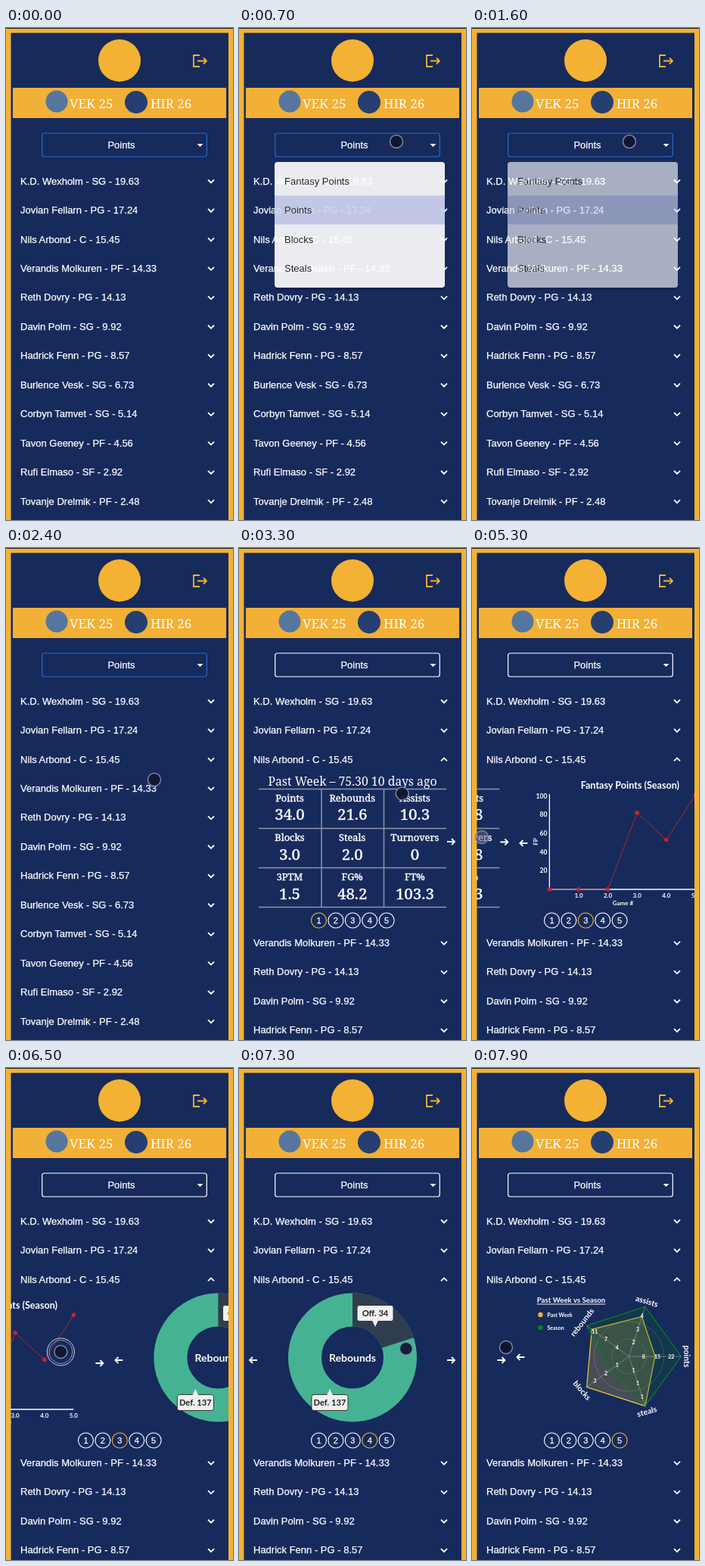
These frames come from a looping animation (300x650 px, 8 s). An HTML page:

```html
<!DOCTYPE html>
<html lang="en">
<head>
<meta charset="utf-8">
<title>Player stats</title>
<style>
html, body { margin: 0; width: 100%; height: 100%; overflow: hidden; background: #f2b134; }
svg { display: block; width: 300px; height: 650px; }
text { fill: #fff; font-family: "Liberation Sans", Arial, sans-serif; }
.list { stroke: #fff; stroke-width: .25; }
.serif { font-family: "Noto Serif", serif; }
.stat { stroke: #fff; stroke-width: .4; }
.chart { font-family: Lato, sans-serif; font-weight: 700; }
.mid { text-anchor: middle; }
.end { text-anchor: end; }
.dark { fill: #222; }
.line { fill: none; stroke: #fff; stroke-width: 1.8; }
.table { fill: none; stroke: #8f93a3; stroke-width: 1.5; }
</style>
</head>
<body>
<svg id="stage" viewBox="0 0 300 650"></svg>
<script>
const NAVY = '#162a5c', GOLD = '#f3b234', LOOP = 8000, PAGE = 287;
const stage = document.getElementById('stage');
const $ = id => document.getElementById(id);

// y is the vertical middle of the text
const text = (x, y, str, size, cls = '', attrs = '') =>
  `<text x="${x}" y="${y + size * .36}" font-size="${size}" class="${cls}" ${attrs}>${str}</text>`;
const path = (d, cls = 'line', attrs = '') => `<path d="${d}" class="${cls}" ${attrs}/>`;
const circle = (x, y, r, attrs) => `<circle cx="${x}" cy="${y}" r="${r}" ${attrs}/>`;
const rect = (x, y, w, h, attrs) => `<rect x="${x}" y="${y}" width="${w}" height="${h}" ${attrs}/>`;
const arrow = (x, y, dir) =>
  path(`M${x - 5 * dir} ${y}h${10 * dir}m${-4 * dir} -4l${4 * dir} 4l${-4 * dir} 4`);

// Player list
const players = [
  'K.D. Wexholm - SG - 19.63', 'Jovian Fellarn - PG - 17.24', 'Nils Arbond - C - 15.45',
  'Verandis Molkuren - PF - 14.33', 'Reth Dovry - PG - 14.13', 'Davin Polm - SG - 9.92',
  'Hadrick Fenn - PG - 8.57', 'Burlence Vesk - SG - 6.73', 'Corbyn Tamvet - SG - 5.14',
  'Tavon Geeney - PF - 4.56', 'Rufi Elmaso - SF - 2.92', 'Tovanje Drelmik - PF - 2.48'
];
const rows = players.map((name, i) => {
  const y = 202 + i * 38.45;
  return text(19, y, name, 13, 'list') +
    `<g transform="translate(271 ${y + .5})">${path('M-4 -2L0 2L4 -2', 'line', i === 2 ? 'id="chevron"' : '')}</g>`;
});

// Carousel pages
const statNames = ['Points', 'Rebounds', 'Assists', 'Blocks', 'Steals', 'Turnovers', '3PTM', 'FG%', 'FT%'];
function statPage(title, values) {
  const cells = values.map((v, i) => {
    const x = 61 + i % 3 * 82.7, y = 330 + Math.floor(i / 3) * 52.3;
    return text(x, y, statNames[i], 12.8, 'serif mid stat') + text(x, y + 22, v, 20.5, 'serif mid stat');
  });
  return text(144, 308, title, 15.8, 'serif mid') + cells.join('') +
    path('M20 318.5H268M20 370.5H268M20 422.5H268M20 474.5H268M103 318V474M185.5 318V474', 'table');
}

function linePage() {
  const px = g => 47 + g * 38.6, py = v => 451 - v * 1.235;
  const scores = [0, 0, 0, 82, 53, 101];
  return text(153.5, 313, 'Fantasy Points (Season)', 12.6, 'chart mid') +
    path('M47 325V451H240', 'line', 'style="stroke-width:1.3"') +
    [20, 40, 60, 80, 100].map(v => text(44, py(v), v, 8.5, 'chart end')).join('') +
    [1, 2, 3, 4, 5].map(g => text(px(g), 459, g + '.0', 8, 'chart mid')).join('') +
    text(144, 469, 'Game #', 8, 'chart mid') +
    text(0, 0, 'FP', 8, 'chart mid', 'transform="translate(29 388) rotate(-90)"') +
    path('M' + scores.map((v, g) => px(g) + ' ' + py(v)).join('L'), '', 'fill="none" stroke="#b3282d"') +
    scores.map((v, g) => circle(px(g), py(v), 2.8, 'fill="#c2272d"')).join('');
}

function donutPage() {
  const tip = (x, y, dir, str) =>
    rect(x - 24, y - 10.5, 48, 21, 'rx="3" fill="#f0f0f0" stroke="#333"') +
    path(`M${x - 4} ${y + 9.5 * dir}L${x} ${y + 18 * dir}L${x + 4} ${y + 9.5 * dir}z`, '', 'fill="#f0f0f0"') +
    text(x, y, str, 11.2, 'chart mid dark');
  return circle(144, 382.5, 63, 'fill="none" stroke="#45b393" stroke-width="44"') +
    circle(144, 382.5, 63, 'fill="none" stroke="#2f3e4e" stroke-width="44" pathLength="360" stroke-dasharray="72 288" transform="rotate(-90 144 382.5)"') +
    text(144, 383, 'Rebounds', 14, 'chart mid') +
    tip(174, 324, 1, 'Off. 34') + tip(114, 442, -1, 'Def. 137');
}

function radarPage() {
  const cx = 156, cy = 381, R = 69;
  const at = (i, f) => {
    const a = -i * Math.PI * .4;
    return [cx + R * f * Math.cos(a), cy + R * f * Math.sin(a)];
  };
  const shape = (fs, fill, stroke) => path('M' + fs.map((f, i) => at(i, f).join(' ')).join('L') + 'z', '',
    `fill="${fill}" fill-opacity=".22" stroke="${stroke}" stroke-width="1.2"`);
  const axes = [['points', 90, [8, 15, 22]], ['assists', 16, [2, 3, 4]], ['rebounds', -52, [4, 7, 11]],
    ['blocks', 50, [1, 2, 3]], ['steals', -16, [1, 1, 1]]];
  const labels = axes.map(([name, turn, ticks], i) => {
    const [x, y] = at(i, 1.11);
    return path(`M${cx} ${cy}L${at(i, 1).join(' ')}`, '', 'stroke="#aab3c8" stroke-width=".5"') +
      text(0, 0, name, 10.5, 'chart mid', `transform="translate(${x} ${y}) rotate(${turn})"`) +
      ticks.map((v, k) => text(...at(i, .28 + k * .265), v, 7, 'chart mid')).join('');
  });
  return text(79.5, 307, 'Past Week vs Season', 9.7, 'chart mid', 'text-decoration="underline"') +
    [['Past Week', GOLD, 326], ['Season', '#0f7f1f', 343]].map(([s, c, y]) =>
      circle(39, y, 3.2, `fill="${c}"`) + text(48, y, s, 7, 'chart')).join('') +
    [1 / 3, 2 / 3].map(f => circle(cx, cy, R * f, 'fill="none" stroke="#8f9ab0" stroke-width=".6" stroke-dasharray="2 1.5"')).join('') +
    shape([.5, .8, .88, 1, 1], '#f0c93c', '#f0c93c') + shape([1, 1, 1, .45, 1], '#0a6a1a', '#0f7f1f') + labels.join('');
}

const pages = [
  statPage('Past Week – 75.30 10 days ago', ['34.0', '21.6', '10.3', '3.0', '2.0', '0', '1.5', '48.2', '103.3']),
  statPage('Season – 729.60 Total Pts', ['347.7', '171.2', '68.8', '26.3', '14.5', '62.8', '22.4', '53.6', '80.3']),
  linePage(), donutPage(), radarPage()
].map((body, i) => {
  const y = [388, 388.5, 390, 386, 382][i];
  return `<g transform="translate(${i * PAGE})">${body}${i ? arrow(13, y, -1) : ''}${i < 4 ? arrow(274, y, 1) : ''}</g>`;
});
const dots = pages.map((_, i) => circle(105.5 + i * 22.4, 492, 10, `class="dot" fill="none" stroke-width="1.1"`) +
  text(105.5 + i * 22.4, 492, i + 1, 11, 'mid list'));
const options = ['Fantasy Points', 'Points', 'Blocks', 'Steals'];

stage.innerHTML = `
  <clipPath id="panelClip"><rect id="panelBox" x="6" y="297" width="288"/></clipPath>
  ${rect(0, 0, 300, 650, `fill="${GOLD}"`)}
  ${rect(0, 0, 300, 1, 'fill="#222"')}
  ${rect(6.5, 6.5, 287.5, 644, `fill="${NAVY}"`)}
  ${circle(150, 43, 28, `fill="${GOLD}"`)}
  ${path('M256 36H248V51H256M253 43.5H265M261 39.5L265 43.5L261 47.5', 'line', `style="stroke:${GOLD}"`)}
  ${rect(9, 79, 282, 40, 'fill="#f3b037"')}
  ${circle(67, 97, 14.5, 'fill="#55779f"')}${text(84, 99.5, 'VEK 25', 17, 'serif')}
  ${circle(172, 98, 15, 'fill="#263f72"')}${text(191, 99.5, 'HIR 26', 17, 'serif')}
  ${rect(47.7, 139, 217.6, 31, 'id="select" rx="3" fill="none" stroke-width="1.2"')}
  ${text(152.5, 154.5, 'Points', 13, 'mid list')}
  ${path('M252.5 153h8l-4 4z', '', 'fill="#fff"')}
  ${rows.slice(0, 3).join('')}
  <g id="lower">${rows.slice(3).join('')}</g>
  <g clip-path="url(#panelClip)"><g id="pages">${pages.join('')}</g>${dots.join('')}</g>
  <g id="menu">
    ${rect(48, 179, 224, 168, 'rx="4" fill="#000" opacity=".2"')}
    ${rect(47, 177, 225, 166, 'rx="4" fill="#fff"')}
    ${rect(47, 221.5, 225, 38, 'fill="#d2d6f1"')}
    ${options.map((s, i) => text(60, 202 + i * 38.45, s, 13, 'dark')).join('')}
  </g>
  <g id="cursor">
    <circle id="ring" r="18" fill="none" stroke="#cfd5e4"/>
    <circle id="ring2" r="15.5" fill="none" stroke="#8d97b3"/>
    <circle id="tip" r="8.5" stroke="#7d87a3" stroke-width="1.5"/>
  </g>`;

// Motion
const clamp = u => Math.max(0, Math.min(1, u));
const ramp = (t, a, b) => clamp((t - a) / (b - a));
const smooth = u => u * u * (3 - 2 * u);
const easeOut = u => 1 - (1 - u) ** 2;

// press, release, rest, share of the page dragged
const swipes = [[3800, 4080, 4400, .545], [4950, 5200, 5550, .66], [6250, 6560, 6880, .674], [7500, 7780, 8130, .63]];
const presses = [[430, 530], [1430, 1530], [2790, 2880], ...swipes];
const trail = [
  [200, 226, 205], [430, 208, 150], [1600, 208, 150], [1800, 206, 173], [2400, 196, 306], [2750, 192, 281],
  [2950, 192, 281], [3750, 246, 380], [3800, 246, 380], [4080, 83, 381], [4100, 74, 381], [4300, 66, 382],
  [4900, 232, 382], [4950, 232, 382], [5200, 42, 382], [5300, 13, 382], [5450, 11, 382], [6180, 229, 375],
  [6250, 229, 375], [6500, 73, 375], [6560, 36, 375], [6750, 30, 374], [7420, 262, 370], [7500, 262, 370],
  [7780, 80, 369], [7900, 45, 369], [8000, 40, 369]
];
function follow(t) {
  const i = Math.max(1, trail.findIndex(k => k[0] >= t));
  const [a, b] = [trail[i - 1], trail[i]], u = ramp(t, a[0], b[0]);
  return [a[1] + (b[1] - a[1]) * u, a[2] + (b[2] - a[2]) * u];
}

function draw(t) {
  const open = smooth(ramp(t, 2880, 3180));
  $('lower').setAttribute('transform', `translate(0 ${204 * open})`);
  $('panelBox').setAttribute('height', 211 * open);
  $('chevron').setAttribute('transform', `rotate(${180 * open})`);
  $('select').setAttribute('stroke', t < 2880 ? '#2a6cc9' : '#fff');

  let pos = 0, active = 0;
  for (const [press, release, rest, share] of swipes) {
    pos += share * ramp(t, press, release) + (1 - share) * easeOut(ramp(t, release, rest));
    active += t >= release;
  }
  $('pages').setAttribute('transform', `translate(${6 - pos * PAGE})`);
  document.querySelectorAll('.dot').forEach((dot, i) => dot.setAttribute('stroke', i === active ? GOLD : '#fff'));

  const grow = .75 + .25 * easeOut(ramp(t, 500, 660));
  $('menu').setAttribute('opacity', ramp(t, 500, 720) * (1 - ramp(t, 1530, 1720)));
  $('menu').setAttribute('transform', `translate(159.5 240) scale(${grow}) translate(-159.5 -240)`);

  const down = presses.some(([a, b]) => t >= a && t < b);
  const fading = swipes.some(([, b]) => t >= b && t < b + 110);
  $('cursor').setAttribute('transform', `translate(${follow(t)})`);
  $('cursor').setAttribute('opacity', ramp(t, 200, 300));
  $('ring').setAttribute('opacity', +down);
  $('ring2').setAttribute('opacity', +down);
  $('tip').setAttribute('fill', fading ? 'rgba(95,100,122,.55)' : 'rgba(16,20,44,.92)');
}

const start = performance.now();
function tick(now) {
  draw(Math.max(0, now - start) % LOOP);
  requestAnimationFrame(tick);
}
draw(0);
requestAnimationFrame(tick);
</script>
</body>
</html>
```
